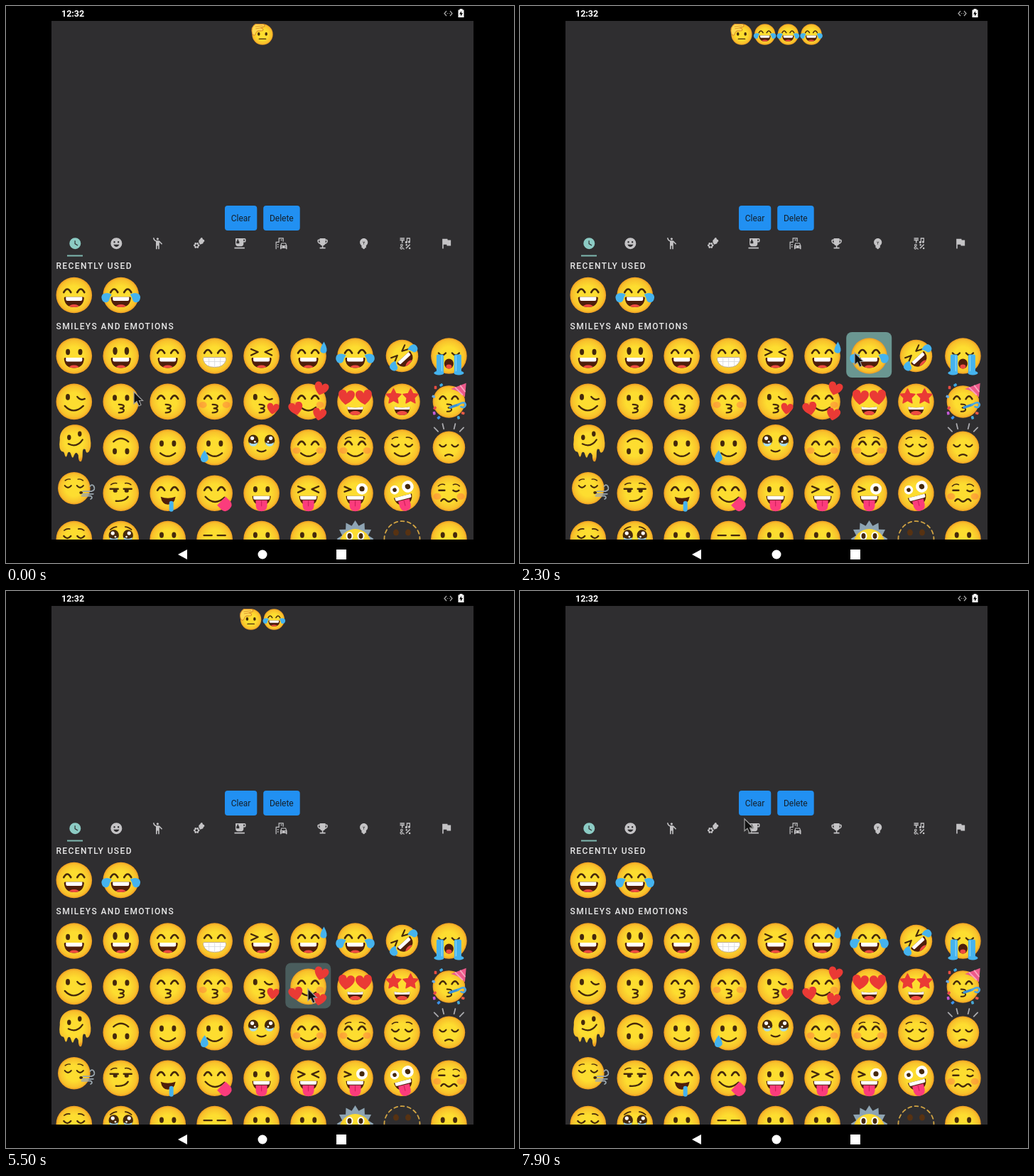
These frames come from a looping animation (715 by 784 pixels, 8 s). An HTML page with a canvas:

```html
<!DOCTYPE html>
<html lang="en">
<head>
<meta charset="utf-8">
<title>Emoji picker</title>
<style>
html, body { margin: 0; width: 100%; height: 100%; overflow: hidden; background: #000; }
canvas { display: block; }
</style>
</head>
<body>
<canvas id="stage" width="715" height="784"></canvas>
<script>
const LOOP = 8000, W = 715, H = 784;
const INK = '#45290c', BLUE = '#45b3ee', RED = '#ea3a35', PINK = '#fb3c7c', PANEL = '#2f2e30';
const stage = document.getElementById('stage').getContext('2d');
let c = stage;

// drawing helpers
const fill = (d, col = INK, rule) => { c.fillStyle = col; c.fill(new Path2D(d), rule); };
const line = (d, w = 2.4, col = INK) => { c.lineWidth = w; c.strokeStyle = col; c.stroke(new Path2D(d)); };
const oval = (x, y, rx, ry = rx, col = INK) => {
  c.beginPath(); c.ellipse(x, y, rx, ry, 0, 0, 7); c.fillStyle = col; c.fill();
};
const at = (x, y, k, r, draw) => {
  c.save(); c.translate(x, y); c.rotate(r); c.scale(k, k); draw(); c.restore();
};
const both = draw => { draw(); c.save(); c.scale(-1, 1); draw(); c.restore(); };
const box = (x, y, w, h, r, col) => {
  c.beginPath(); c.roundRect(x, y, w, h, r); c.fillStyle = col; c.fill();
};
const ring = (x, y, r) => `M${x - r} ${y}a${r} ${r} 0 1 0 ${2 * r} 0a${r} ${r} 0 1 0 ${-2 * r} 0z`;
const inside = (d, draw) => { c.save(); c.clip(new Path2D(d)); draw(); c.restore(); };

const skin = () => {
  const g = c.createRadialGradient(0, 0, 0, 0, 0, 25.3);
  g.addColorStop(.5, '#fddd30'); g.addColorStop(.88, '#f8c02b'); g.addColorStop(1, '#ee9c22');
  return g;
};
const heart = (x, y, k, r = 0) => at(x, y, k, r, () =>
  fill('M0 9C-14 0-11-9-5-9Q-1-9 0-5Q1-9 5-9C11-9 14 0 0 9z', RED));
const star = (x, y, r) => {
  let d = '';
  for (let i = 0; i < 10; i++) {
    const a = i * Math.PI / 5, q = i % 2 ? r * .5 : r;
    d += (i ? 'L' : 'M') + (x + q * Math.sin(a)) + ' ' + (y - q * Math.cos(a));
  }
  fill(d + 'z', RED); line(d + 'z', 1.5, RED);
};
const openMouth = (d, teeth = 7) => {
  fill(d, '#4f1f0b');
  inside(d, () => { oval(0, 18, 8, 5, '#ee4a40'); box(-11.5, 0, 23, teeth, 2, '#fff'); });
};
const bigEye = (x, y, r) => {
  oval(x, y, r, r, '#fff'); oval(x, y, r * .45);
};
const wetEyes = (x, y) => both(() => at(x, y, 1, 0, () => {
  oval(0, 0, 7.2, 7.8);
  oval(1.5, -3, 2.6, 2.6, '#fff'); oval(-2.2, 2, 1.4, 1.4, '#fff');
  fill('M-6 3Q0 7 6 3Q5 8.500 0 8.500Q-5 8.500-6 3z', '#a9dff5');
}));
const tongue = () => {
  fill('M-8 10H8V18Q7 25.500 0 25.500Q-7 25.500-8 18z', PINK);
  line('M0 11V18', 1.2, '#d01f5e');
};

const parts = {
  f: () => oval(0, 0, 25.3, 25.3, skin()),
  up: () => c.translate(0, -7),
  small: () => c.scale(.9, .9),
  flip: () => c.rotate(Math.PI),
  tilt: () => c.rotate(-.75),
  lean: () => c.rotate(-.25),
  eyes: () => both(() => oval(8.7, -5.5, 3, 4.2)),
  tall: () => both(() => oval(8.2, -7, 3.2, 5.5)),
  happy: () => both(() => line('M4.500-4Q9.500-13 14.500-4', 2.7)),
  shut: () => both(() => line('M4.500-4Q9.500 2 14.500-4')),
  dash: () => both(() => line('M4-5H15')),
  squeeze: () => both(() => line('M14.500-9.500L5-5.500L14.500-1')),
  wink: () => { oval(-8.8, -6.5, 3, 4.3); line('M4.500-7Q9-1 15-4'); },
  sly: () => both(() => { line('M4-6H15'); oval(8, -3.5, 3, 2.6); }),
  brows: () => both(() => line('M6-14Q10-15 14-12', 1.6)),
  open: () => openMouth('M-12.500 2.500H12.500Q14.500 2.500 14 5Q12.500 17 0 17Q-12.500 17-14 5Q-14.500 2.500-12.500 2.500z', 8),
  grin: () => openMouth('M-11 7Q0 9.500 11 7Q11 19 0 19Q-11 19-11 7z', 11),
  teeth: () => {
    const d = 'M-14 2H14Q17 2 16 6Q13 16 0 16Q-13 16-16 6Q-17 2-14 2z';
    fill(d, '#fff'); line(d, 1, '#c1aa84');
    inside(d, () => line('M-16 8H16M-8 2V16M0 2V16M8 2V16', .8, '#d5d6da'));
  },
  smile: () => line('M-10.500 8Q0 17 10.500 8'),
  broad: () => line('M-13 6Q-1 19 13 6'),
  tiny: () => line('M-6 11Q0 15 6 11', 2.2),
  frown: () => line('M-6 13Q0 9 6 13'),
  flat: () => line('M-8 11H8'),
  smirk: () => line('M-7 11Q6 12 10 5'),
  wavy: () => line('M-11 11Q-8 6-4 10T4 10T11 11'),
  kiss: () => line('M-3 4Q5 4 4 7Q3 9-1 9.500Q5 10 4 13Q3 15.500-3 15.500', 2.2),
  blush: () => both(() => oval(16.5, 4.5, 5.5, 4.5, 'rgba(255,112,67,.42)')),
  sweat: () => {
    fill('M22-20Q28-9 25-5Q21-2 17-6Q16-11 22-20z', BLUE);
  },
  tears: () => both(() =>
    fill('M13-1Q20-5 26-1Q29 4 25 9Q20 12 17 8Q16 3 13-1z', BLUE)),
  streams: () => {
    both(() => {
      box(7.5, -2, 10, 28, 2, BLUE); line('M10 0V24', 1.6, '#82d3f7');
      oval(14, 24, 7, 3, BLUE);
    });
  },
  sob: () => { oval(0, 11, 6.5, 7, '#4f1f0b'); oval(0, 15, 4, 3, '#ee4a40'); },
  loveKiss: () => heart(16, 10, .85, .15),
  hearts: () => { heart(18, -18, 1, .3); heart(-17.5, 10, 1, -.2); heart(15.5, 18, .95, .2); },
  heartEyes: () => both(() => heart(12.5, -6, 1.15, -.12)),
  stars: () => both(() => star(12, -7, 11)),
  party: () => {
    fill('M3-20L27-29L25-7Q15-18 3-20z', '#ed5a8b');
    line('M10-22L21-11M18-25L25-16', 2, '#f7a5bd');
    line('M2 9L14 5', 4, '#3a91d8');
    line('M14 5Q25-2 26 5Q25 11 19 8', 3, '#4ca6df');
    [[-21, -22, '#e84c43'], [-12, -26, '#3fa8e0'], [-24, -8, '#69a9e3'], [-23, 18, '#c45ad6'],
     [-16, 25, '#3d91e8'], [22, 18, '#e85a47'], [15, 25, '#48a9d6'], [-22, 10, '#e5494a']]
      .forEach(([x, y, col], i) => at(x, y, 1, i, () => box(-2, -2.5, 4, 5, 1, col)));
  },
  melt: () => {
    fill('M-20-4C-21-32 23-32 23-4Q25 6 21 13Q17 17 16 10Q12 7 12 15Q12 27 9 27Q6 27 6 18Q3 11 0 18Q-2 25-4 18Q-6 11-9 15Q-11 24-13 18Q-14 12-17 13Q-22 10-20-4z', skin());
    oval(-7, -7, 2.7, 3.7); oval(8, -12, 2.7, 3.7);
    line('M-8 2Q4 8 12-4', 2.2);
  },
  oneTear: () => fill('M-14 4Q-23 15-18 20Q-13 23-9 17Q-8 13-14 4z', BLUE),
  held: () => wetEyes(11.5, -3),
  puppy: () => { wetEyes(10, -5); both(() => line('M6-17Q10-17 15-13', 1.6)); },
  nod: () => {
    line('M-8-29L-10-37M-17-25L-23-31M8-29L10-37M17-25L23-31', 2, '#a9a9ad');
  },
  wind: () => {
    oval(11, 7, 2.8, 2.2);
    line('M14 5H27Q34 3 31-3Q28-7 25-3M13 9H30M12 12H26Q30 15 26 17', 2, '#9ba7ae');
  },
  drool: () => {
    fill('M-10 5Q0 9 11 5Q9 16 0 16Q-8 16-10 5z', '#4f1f0b');
    box(2, 11, 6, 15, 3, BLUE);
  },
  yum: () => {
    line('M-13 5Q0 19 14 6');
    at(13.5, 15, .95, -.8, () => fill('M-9-6H9V4Q8 11 0 11Q-8 11-9 4z', PINK));
  },
  lick: () => { openMouth('M-13 4H13Q12 17 0 17Q-12 17-13 4z', 9); tongue(); },
  winkBig: () => { line('M-15-9L-6-5L-15-2'); bigEye(9.5, -6, 8); },
  zany: () => { bigEye(-9, -7, 6.3); bigEye(10, -7, 8.3); },
  woozy: () => { both(() => line('M6-12Q11-14 15-10', 1.6)); line('M-14-4H-6M6-4Q10-1 14-4'); },
  blast: () => {
    let d = '';
    for (let i = 0; i < 24; i++) {
      const a = i * Math.PI / 12, r = i % 2 ? 19 : 26;
      d += (i ? 'L' : 'M') + r * Math.cos(a) + ' ' + r * Math.sin(a);
    }
    fill(d + 'z', '#8ea4b3');
    oval(0, 7, 22, 21, skin());
    both(() => { oval(8, -4, 5, 6, '#fff'); oval(8, -4, 3, 4); });
  },
  dotted: () => {
    c.setLineDash([5, 4.5]); line(ring(0, 0, 25), 1.8, '#d2a443'); c.setLineDash([]);
    both(() => oval(8.5, -9, 4, 4.5, '#573212'));
  },
  salute: () => {
    both(() => oval(9, -1, 3, 4.2));
    const d = 'M-25-2Q-29-18-17-25L1-25Q8-23 4-19L-4-16Q5-13 0-9L-12-8Q-16-6-17 0Q-21 5-25-2z';
    fill(d, '#ffd84f'); line(d, 1.8, '#d98a28');
    line('M-17-19L0-21M-16-14L-4-16', 1.4, '#d98a28');
  }
};

const laugh = 'f happy open tears', love = 'f happy smile blush hearts';
const rows = [
  ['f eyes open', 'f tall open', 'f happy open', 'f happy teeth', 'f squeeze open', 'f happy open sweat',
   laugh, 'tilt small f squeeze open tears', 'f shut sob streams'],
  ['f wink broad', 'f eyes kiss', 'f happy kiss', 'f blush happy kiss', 'f wink kiss loveKiss', love,
   'f grin heartEyes', 'f grin stars', 'small f happy kiss party'],
  ['up melt', 'flip f eyes smile', 'f eyes smile', 'f eyes smile oneTear', 'up f held tiny', 'f blush happy smile',
   'f blush happy smile brows', 'f shut smile brows', 'small nod f shut frown'],
  ['up small f shut brows wind', 'f sly brows smirk', 'f happy drool', 'f happy yum', 'f eyes lick',
   'f squeeze lick', 'f lick winkBig', 'lean f lick zany', 'f blush woozy wavy'],
  ['f shut brows', 'f puppy', 'f eyes', 'f dash', 'f eyes', 'f eyes', 'blast', 'dotted', 'f eyes']
];
const emoji = (spec, x, y, k = 1) => at(x, y, k, 0, () => {
  c.lineCap = c.lineJoin = 'round';
  spec.split(' ').forEach(p => parts[p]());
});

// 24-unit tab icons
const petals = [0, 1, 2, 3, 4, 5].map(i =>
  ring(8 + 3.6 * Math.cos(i * Math.PI / 3), 15.5 + 3.6 * Math.sin(i * Math.PI / 3), 1.8)).join('');
const icons = [
  ring(12, 12, 10) + 'M16.200 16.200L11 13V7h1.500v5.200l4.500 2.700z',
  ring(12, 12, 10) + ring(8.5, 9.5, 1.5) + ring(15.5, 9.5, 1.5) + 'M12 18c-2.300 0-4.200-1.700-5-4h10c-.8 2.300-2.700 4-5 4z',
  ring(12, 4, 2) + 'M15.900 8.100C15.500 7.700 14.800 7 13.500 7H11C8.200 7 6 4.700 6 2H4c0 3.200 2.100 5.800 5 6.700V22h2v-6h2v6h2V10l4 4 1.400-1.400z',
  petals + 'M12 10q-1-4 2-5q1-4 4-3l1 3q3 0 3 3l-2 2q0 3-3 3l-3 1z',
  'M20 3H4v10c0 2.200 1.800 4 4 4h6c2.200 0 4-1.800 4-4v-3h2c1.100 0 2-.9 2-2V5c0-1.100-.9-2-2-2zm0 5h-2V5h2zM2 19h18v2H2zM9 5v2l1.500 1.500V12h-5V8.500L7 7V5z',
  'M2 22V9h5V2h9v7h-1.500V3.500h-6v7h-5V22zM5 13h2v2H5zM5 17h2v2H5zM11 5h2v2h-2zM12 11h8l2 5v6h-2v-1.500h-8V22h-2v-6zM13 12.500l-1 3h8l-1-3z' + ring(13, 18, 1) + ring(19, 18, 1),
  'M19 5h-2V3H7v2H5c-1.100 0-2 .9-2 2v1c0 2.500 1.900 4.600 4.400 4.900.6 1.500 2 2.600 3.600 3V19H7v2h10v-2h-4v-3.100c1.600-.4 3-1.500 3.600-3C19.100 12.600 21 10.500 21 8V7c0-1.100-.9-2-2-2zM5 8V7h2v3.800C5.800 10.400 5 9.300 5 8zm14 0c0 1.300-.8 2.400-2 2.800V7h2z',
  'M12 3C8.100 3 5 6.100 5 10c0 2.400 1.200 4.500 3 5.700V19q0 1 1 1h1q0 2 2 2t2-2h1q1 0 1-1v-3.300c1.800-1.200 3-3.300 3-5.700 0-3.900-3.100-7-7-7zM11.600 14v-3L10 9.300l.6-.6L12 10.100l1.400-1.400.6.6L12.400 11v3z',
  'M3 2h8v2H3zM3 5h8v2H8v4H6V7H3zM21 2v7.500a2 2 0 1 1-1.500-2V4H16v6a2 2 0 1 1-1.500-2V2zM20 13l1.300 1.300-7 7L13 20z' +
    ring(14.5, 14.5, 1.6) + ring(20, 20.5, 1.6) + ring(6, 15, 2.4) + ring(6, 15, 1) + ring(5.5, 20, 2.6) + ring(5.5, 20, 1.1) + 'M7.500 18l3.500 4-1 1-3.500-4z',
  'M14.400 6L14 4H5v17h2v-7h5.600l.4 2h7V6z'
];

const label = (text, x, y, font, col, spacing = 0, align = 'left') => {
  c.font = font + ' Roboto, sans-serif';
  c.letterSpacing = spacing + 'px';
  c.textAlign = align;
  c.fillStyle = col;
  c.fillText(text, x, y);
};
const cellX = i => 95.8 + 65.95 * i, cellY = j => 492.5 + 64.4 * j;

// everything that never changes, above the highlights
function makeLayer() {
  const canvas = document.createElement('canvas');
  canvas.width = W; canvas.height = H;
  c = canvas.getContext('2d');

  label('12:32', 78, 14.5, '600 12.5px', '#fff');
  line('M620 7L617 10.500L620 14M625 7L628 10.500L625 14M621 10.500H622M623.500 10.500H624.500', 1.2, '#aaa');
  fill('M638.500 4h4v1.500h2v10.500h-8V5.500h2zM641 7l-3 4.500h2v3l3-4.500h-2z', '#fff', 'evenodd');

  box(308, 281, 45.3, 35, 4, '#2190f2');
  box(362.2, 281, 51.5, 35, 4, '#2190f2');
  label('Clear', 330.5, 303, '12px', '#15202b', 0, 'center');
  label('Delete', 387.8, 303, '12px', '#15202b', 0, 'center');

  icons.forEach((d, i) => at(97.3 + 58.05 * i - 9.6, 324.6, .8, 0, () =>
    fill(d, i ? '#c4c3c5' : '#8ccbc4', 'evenodd')));
  box(86, 350.5, 22, 2, 0, '#7fb8b0');

  label('RECENTLY USED', 70.5, 369.5, '500 12px', '#e8e8e8', 1.38);
  label('SMILEYS AND EMOTIONS', 70.5, 454.5, '500 12px', '#e8e8e8', 1.38);

  inside('M64 21H658V751H64z', () => {
    emoji(rows[0][2], cellX(0), 407);
    emoji(laugh, cellX(1), 407);
    rows.forEach((row, j) => row.forEach((spec, i) => emoji(spec, cellX(i), cellY(j))));
  });

  fill('M255 765V779L242 772z', '#fff');
  oval(361, 772, 6.5, 6.5, '#fff');
  box(465, 765, 14, 14, 0, '#fff');
  c = stage;
  return canvas;
}
const layer = makeLayer();

// x, y, width, height, radius, start, end, strength, colour
const cell = (i, j) => [cellX(i) - 32.3, cellY(j) - 33.5, 64, 64, 8];
const tab = i => [68.5 + 58.05 * i, 317, 58, 35, 3];
const TEAL = '137,203,196', WHITE = '255,255,255';
const glows = [
  [...cell(5, 0), 1300, 1500, .1, TEAL],
  [...cell(6, 0), 1700, 2700, .66, TEAL],
  [...tab(5), 3200, 3400, .03, WHITE],
  [...cell(8, 3), 4400, 4500, .03, TEAL],
  [...cell(5, 1), 5500, 6100, .6, TEAL],
  [...tab(7), 6100, 6200, .02, WHITE]
];
const messages = [[0, 's'], [1800, 'sl'], [2000, 'sll'], [2200, 'slll'], [2500, 'sllll'], [3700, 'slll'],
  [3900, 'sll'], [4100, 'sl'], [5600, 'slh'], [5800, 'slhh'], [7400, '']];
const glyphs = { s: 'f flat salute', l: laugh, h: love };
const path = [[0, 180, 543], [300, 186, 540], [1400, 451, 491], [1600, 475, 488], [2300, 471, 488],
  [2800, 471, 488], [3300, 373, 326], [3600, 383, 301], [4100, 383, 301], [4500, 656, 685],
  [4700, 700, 735], [5000, 652, 762], [5500, 425, 560], [5900, 428, 558], [6200, 487, 336],
  [6600, 400, 299], [7000, 328, 299], [7600, 328, 299], [8000, 312, 328]];

function pointer(t) {
  const k = Math.max(1, path.findIndex(p => p[0] > t));
  const [t0, x0, y0] = path[k - 1], [t1, x1, y1] = path[k];
  const u = (t - t0) / (t1 - t0), e = k === path.length - 1 ? u : u * u * (3 - 2 * u);
  return [x0 + (x1 - x0) * e, y0 + (y1 - y0) * e];
}

function draw(now) {
  const t = Math.floor(now % LOOP / 100) * 100;
  box(0, 0, W, H, 0, '#000');
  box(64, 21, 594, 730, 0, PANEL);
  for (const [x, y, w, h, r, start, end, strength, rgb] of glows) {
    const a = Math.max(0, Math.min(1, (t - start + 100) / 200, 1 - (t - end) / 400));
    if (a) box(x, y, w, h, r, `rgba(${rgb},${a * strength})`);
  }
  c.drawImage(layer, 0, 0);

  const text = messages.filter(m => m[0] <= t).pop()[1];
  [...text].forEach((g, i) => emoji(glyphs[g], 361 + (i - (text.length - 1) / 2) * 32.7, 40, .58));

  inside('M64 0H658V784H64z', () => at(...pointer(t), 1, 0, () => {
    const d = 'M0 0V17L4 13.500L7 20L10 18.500L7.500 12.500H12.500z';
    fill(d, '#111'); line(d, 1.2, '#a0a0a0');
  }));
  requestAnimationFrame(draw);
}
requestAnimationFrame(draw);
</script>
</body>
</html>
```
